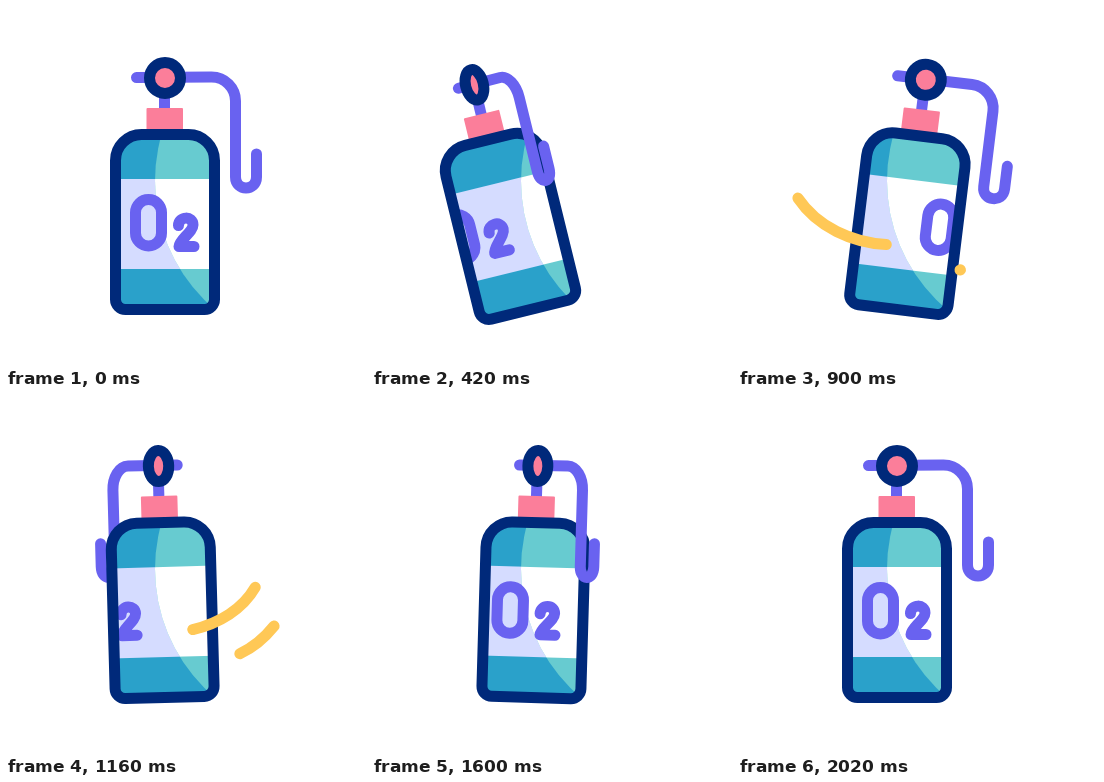
Recreate the animation shown at these times as an HTML page. Size 360x360 px, loop 2400 ms.

```html
<!DOCTYPE html>
<html lang="en">
<head>
<meta charset="utf-8">
<title>Oxygen tank</title>
<style>
  html, body { margin: 0; width: 100%; height: 100%; overflow: hidden; background: #fff; }
  svg { display: block; width: 100vw; height: 100vh; }
  .line { fill: none; stroke-width: 11; stroke-linecap: round; stroke-linejoin: round; }
  .purple { stroke: #6962f0; }
  .navy { stroke: #00297a; }
</style>
</head>
<body>
<svg viewBox="0 0 360 360">
  <defs>
    <path id="shell" d="M109.5 154.5a26 26 0 0 1 26-26h47a26 26 0 0 1 26 26v139a10 10 0 0 1-10 10h-79a10 10 0 0 1-10-10z"/>
    <clipPath id="inside"><use href="#shell"/></clipPath>
    <clipPath id="shine"><circle id="glow" cx="317" cy="175" r="168"/></clipPath>
    <g id="mark" class="line purple">
      <rect x="129.5" y="193.5" width="26" height="46.5" rx="13"/>
      <path d="M172.5 219.5C172.5 210 187 209.5 187 219C187 226 173 234 173 240.5H188"/>
    </g>
  </defs>

  <g id="tank">
    <path id="hoseBack" class="line purple"/>
    <rect x="153" y="84" width="11" height="22" fill="#6962f0"/>
    <rect x="140.5" y="102" width="36.5" height="24" rx="1" fill="#fb7e9a"/>
    <g clip-path="url(#inside)">
      <rect x="104" y="123" width="110" height="186" fill="#2aa1ca"/>
      <rect x="104" y="173" width="110" height="90" fill="#d5dcff"/>
      <g clip-path="url(#shine)">
        <rect x="104" y="123" width="110" height="186" fill="#67cbd0"/>
        <rect x="104" y="173" width="110" height="90" fill="#fff"/>
      </g>
      <use id="markA" href="#mark"/>
      <use id="markB" href="#mark"/>
    </g>
    <use href="#shell" class="line navy"/>
    <path id="hoseFront" class="line purple"/>
    <ellipse id="valve" class="line navy" cx="159" cy="72" ry="15.5" style="fill:#fb7e9a"/>
  </g>

  <path id="streakA" class="line" pathLength="1" d="M55 184C95 258 220 255 252 188"/>
  <path id="streakB" class="line" pathLength="1" d="M222 264Q255 255 278 218"/>
</svg>

<script>
const LOOP = 2400, STEP = 20, MID = 159, WRAP = 160;
const YELLOW = '#ffc856', PALE = '#f9d9d8';
const $ = id => document.getElementById(id);

// Tables of [time in ms, value]
const tilt = [[0, 0], [420, -13.8], [570, -16], [740, -5.7], [940, 8], [1240, -3.6], [1620, 1.7], [2020, 0]];
const spin = [[0, 0], [420, 55], [570, 63], [740, 45], [900, 2], [1160, -131], [1600, -310], [2020, -360]];
const slide = [[0, 0], [420, -34.5], [570, -41], [740, -18], [900, 48], [1160, 105], [1600, 153], [2020, 160]];
const streaks = [
  { el: $('streakA'), from: 720, to: 1300, pale: 760,
    head: [[720, 0.03], [740, 0.115], [900, 0.48], [1160, 0.975], [1200, 1]],
    tail: [[720, 0], [860, 0], [900, 0.04], [1160, 0.645], [1300, 1]] },
  { el: $('streakB'), from: 890, to: 1400, pale: 0,
    head: [[890, 0], [910, 0.02], [1160, 0.77], [1260, 1]],
    tail: [[890, 0], [1000, 0], [1160, 0.17], [1400, 1]] }
];

// Smooth curve through the keys that never overshoots them
function curve(keys, t) {
  const last = keys.length - 1;
  if (t <= keys[0][0]) return keys[0][1];
  if (t >= keys[last][0]) return keys[last][1];
  const rate = i => (keys[i + 1][1] - keys[i][1]) / (keys[i + 1][0] - keys[i][0]);
  const slope = i => {
    if (i === 0 || i === last) return 0;
    const a = rate(i - 1), b = rate(i);
    return a * b > 0 ? 2 * a * b / (a + b) : 0;
  };
  let i = 0;
  while (t >= keys[i + 1][0]) i++;
  const [t0, v0] = keys[i], [t1, v1] = keys[i + 1];
  const d = t1 - t0, u = (t - t0) / d, w = 1 - u;
  return v0 * w * w * (1 + 2 * u) + v1 * u * u * (1 + 2 * w)
    + d * u * w * (slope(i) * w - slope(i + 1) * u);
}

function hosePath(c) {
  const x = v => (MID + v * c).toFixed(2);
  return `M${x(-28.5)} 71.5L${x(46.5)} 71C${x(60)} 71 ${x(70.5)} 82 ${x(70.5)} 95V171`
    + `C${x(70.5)} 185.5 ${x(91.5)} 185.5 ${x(91.5)} 171V148`;
}

function drawStreak(s, t) {
  const shown = t >= s.from && t < s.to;
  s.el.style.display = shown ? '' : 'none';
  if (!shown) return;
  const head = curve(s.head, t), tail = curve(s.tail, t);
  s.el.style.stroke = t < s.pale ? PALE : YELLOW;
  s.el.setAttribute('stroke-dasharray', `${Math.max(head - tail, 0.002)} 3`);
  s.el.setAttribute('stroke-dashoffset', -tail);
}

function draw(t) {
  const lean = curve(tilt, t), turn = curve(spin, t) * Math.PI / 180, shift = curve(slide, t);
  const c = Math.cos(turn), front = Math.sin(turn) >= -1e-6;

  $('tank').setAttribute('transform', `rotate(${lean} ${MID} 309)`);
  $('glow').setAttribute('transform', `rotate(${-lean} ${MID} 309)`);
  $('hoseFront').setAttribute('d', front ? hosePath(c) : '');
  $('hoseBack').setAttribute('d', front ? '' : hosePath(c));
  $('valve').setAttribute('rx', Math.max(Math.abs(c) * 15.5, 0.1));
  $('markA').setAttribute('x', shift);
  $('markB').setAttribute('x', shift - WRAP);
  streaks.forEach(s => drawStreak(s, t));
}

const start = performance.now();
function tick() {
  const t = (performance.now() - start) % LOOP;
  draw(Math.floor(t / STEP) * STEP);
  requestAnimationFrame(tick);
}
tick();
</script>
</body>
</html>
```
